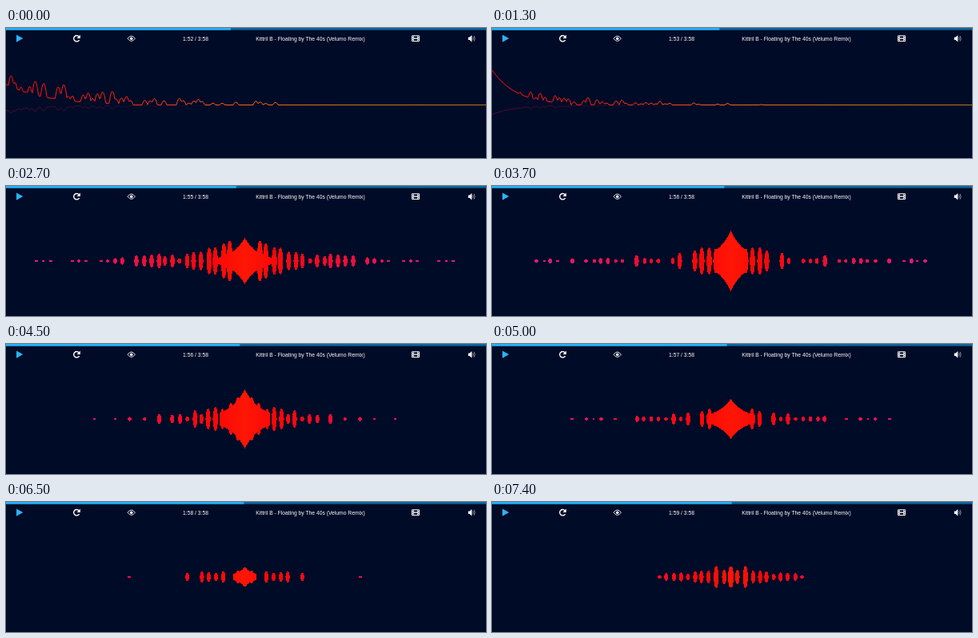
Recreate the animation shown at these times as an HTML page with a canvas. Size 600x163 px, loop 7.5 s.

```html
<!DOCTYPE html>
<html lang="en">
<head>
<meta charset="utf-8">
<title>Audio visualizer</title>
<style>
  html, body { margin: 0; width: 100%; height: 100%; overflow: hidden; background: #000b27; }
  canvas, svg { position: absolute; left: 0; top: 0; width: 600px; height: 163px; }
  text { font: 6.75px "Liberation Sans", Arial, sans-serif; fill: #fff; }
  .line { fill: none; stroke: #fff; stroke-width: 1.4; }
  .thin { stroke-width: .9; }
</style>
</head>
<body>
<canvas id="wave" width="600" height="163"></canvas>
<svg viewBox="0 0 600 163">
  <rect width="600" height="2.6" fill="#0b679b"/>
  <rect id="bar" height="2.6" fill="#22b3fb"/>
  <path d="M13 8.5L21.3 13L13 17.7Z" fill="#29b3f7"/>
  <path class="line" d="M91.2 10.8A3.7 3.7 0 1 0 91.6 15"/>
  <path d="M92.8 8.6V12.9H88.5Z" fill="#fff"/>
  <path class="line thin" d="M152 13.2Q156.7 6.8 161.4 13.2Q156.7 19.6 152 13.2Z"/>
  <circle cx="156.7" cy="13.2" r="1.8" fill="#fff"/>
  <rect x="507" y="9.2" width="10" height="7.8" rx="1" fill="#fff"/>
  <path d="M509.8 10.2h4.4v2.3h-4.4zM509.8 13.7h4.4v2.3h-4.4z" fill="#000b27"/>
  <path d="M508.4 10.2v6M515.6 10.2v6" stroke="#000b27" stroke-dasharray="1.2 1.1"/>
  <path d="M577.8 11.4h1.8L582.3 9V17.4L579.6 15.1H577.8Z" fill="#fff"/>
  <path class="line thin" opacity=".6" d="M583.6 11.3Q584.8 13.2 583.6 15.2M585 9.8Q587.3 13.2 585 16.7"/>
  <text id="clock" x="221" y="15.6"></text>
  <text x="380.5" y="15.6" text-anchor="middle">Kittril B - Floating by The 40s (Velumo Remix)</text>
</svg>
<script>
const LOOP = 7500, STEP = 100, BARS_FROM = 20, MID = 298, BASE = 96.5;
const ctx = wave.getContext('2d');
const rand = n => { const v = Math.sin(n * 12.9898) * 43758.5453; return v - Math.floor(v); };

// Loudness over time: the solid body (top, decay, end) and the peaks around it (peak, fall, reach).
const moods = [
  { step: 0, top: 26, decay: 50, end: 130, peak: 42, fall: 150, reach: 338 },
  { step: 13, top: 44, decay: 30, end: 80, peak: 24, fall: 130, reach: 340 },
  { step: 27, top: 29, decay: 17, end: 34, peak: 34, fall: 90, reach: 270 },
  { step: 37, top: 38, decay: 18, end: 21, peak: 24, fall: 110, reach: 298 },
  { step: 45, top: 37, decay: 20, end: 32, peak: 34, fall: 65, reach: 197 },
  { step: 56, top: 36, decay: 16, end: 28, peak: 20, fall: 95, reach: 255 },
  { step: 74, top: 0, decay: 10, end: 1, peak: 18, fall: 85, reach: 138 }
];

function moodAt(step) {
  const next = Math.max(1, moods.findIndex(m => m.step >= step));
  const a = moods[next - 1], b = moods[next];
  const k = (step - a.step) / (b.step - a.step);
  const pulse = 1 - .35 * Math.abs(Math.sin(3 * Math.PI * k));
  const mood = {};
  for (const key in a) mood[key] = a[key] + (b[key] - a[key]) * k;
  mood.top *= pulse;
  mood.peak *= pulse;
  return mood;
}

// Height of the spectrum at distance u: peaks in even slots, rarer and lower further out.
function spectrum(step, gap, width, power) {
  const { top, decay, end, peak, fall, reach } = moodAt(step);
  const peaks = [];
  for (let i = 0; i * gap < reach; i++) {
    const seed = i * 7.3 + step * 31.7;
    const at = i * gap + 2 * rand(seed + 1) - 1;
    const force = .25 + .75 * rand(seed) ** (.3 + at / 150);
    const rare = rand(seed + 2) > at / reach * .6;
    if (rare) peaks.push([at, force * peak * Math.exp(-at / fall)]);
  }
  return u => {
    const body = u < end ? top * Math.exp(-u / decay) : 0;
    return peaks.reduce((h, [at, p]) => {
      const d = Math.abs(u - at) / (width + p * .07);
      return Math.max(h, p * (1 - d ** power));
    }, body);
  };
}

function gradient(width, ...colors) {
  const g = ctx.createLinearGradient(0, 0, width, 0);
  colors.forEach((c, i) => g.addColorStop(i / (colors.length - 1), c));
  return g;
}
const warm = gradient(600, '#ff0d0d', '#fa2b10', '#f46a13', '#c87a12', '#b8790f');
const shade = gradient(340, 'rgba(150,15,60,.5)', 'rgba(150,15,60,0)');

function trace(level, scale, style) {
  ctx.beginPath();
  for (let x = 0; x <= 600; x++) ctx.lineTo(x, BASE - scale * level(x));
  ctx.strokeStyle = style;
  ctx.stroke();
}

function drawBars(level) {
  for (let u = 0; u < 302; u++) {
    const h = Math.round(level(u));
    if (h < 1) continue;
    ctx.fillStyle = `hsl(${364 - u * .1 - u * u * .0002},${100 - u * .09}%,${51 - u * .01}%)`;
    ctx.fillRect(MID + u, 94 - h, 1, 2 * h);
    ctx.fillRect(MID - u, 94 - h, 1, 2 * h);
  }
}

function draw(now) {
  const step = Math.floor(now % LOOP / STEP), sec = step / 10;
  ctx.clearRect(0, 0, 600, 163);
  if (step < BARS_FROM) {
    const level = spectrum(step, 6, 3, 2);
    trace(level, -.27, shade);
    trace(level, 1, warm);
  } else drawBars(spectrum(step, 9, 2.3, 3));
  bar.setAttribute('width', 281 + 2.52 * sec);
  clock.textContent = `1:${Math.floor(52.35 + sec)} / 3:58`;
}

const start = performance.now();
function tick() {
  draw(performance.now() - start);
  requestAnimationFrame(tick);
}
tick();
</script>
</body>
</html>
```
